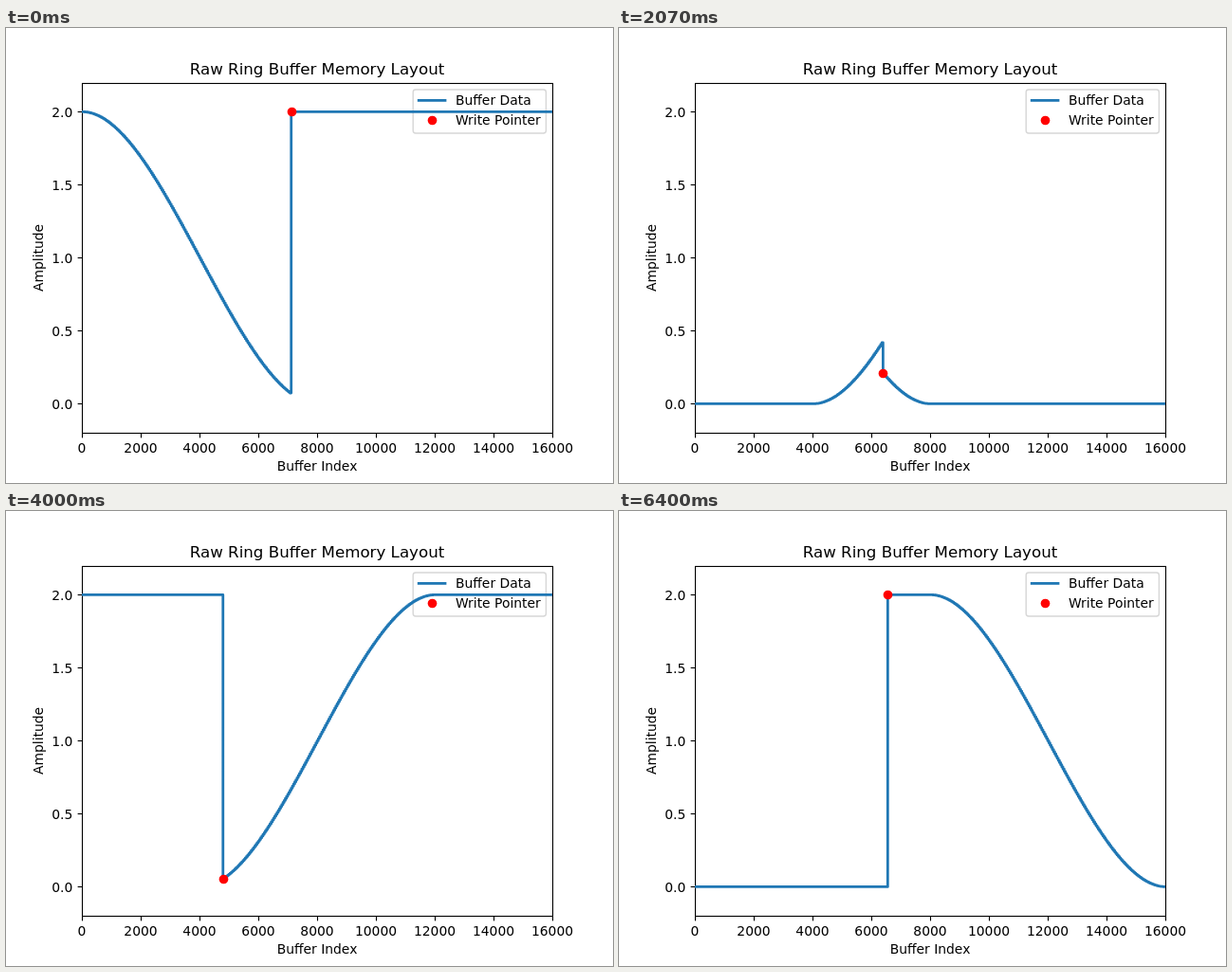
These frames come from a looping animation (640x480 px, 6.47 s). An HTML page with a canvas:

```html
<!DOCTYPE html>
<html lang="en">
<head>
<meta charset="utf-8">
<title>Raw Ring Buffer Memory Layout</title>
<style>
  html, body { margin: 0; width: 100%; height: 100%; overflow: hidden; background: #fff; }
  canvas { display: block; width: 640px; height: 480px; }
</style>
</head>
<body>
<canvas id="stage" width="640" height="480"></canvas>
<script>
const ctx = document.getElementById('stage').getContext('2d');

const LOOP = 6470, FRAMES = 97;
const SIZE = 16000;            // samples in the ring
const BLOCK = 80;              // samples per write
const STEP = 40;               // samples per level of the ramp
const RAMP = 8000, PERIOD = 40000;
const BOX = { x: 80, y: 57.6, w: 496, h: 369.6 };
const BLUE = '#1f77b4', RED = '#ff0000';

// [frame, blocks written so far]; writes arrive slightly unevenly
const WRITES = [
  [0, 89], [10, 150], [16, 188], [20, 212], [30, 276], [31, 280], [40, 335],
  [41, 344], [60, 460], [70, 522], [80, 582], [84, 608], [90, 645], [96, 682]
];

const px = i => BOX.x + i / SIZE * BOX.w;
const py = v => BOX.y + (2.2 - v) / 2.4 * BOX.h;

function ramp(n) {
  const s = Math.min(1, Math.floor(n / STEP) * STEP / RAMP);
  return 2 * s * s * (3 - 2 * s);
}

// Level falls at the start of each period and rises again at its middle.
function signal(n) {
  const p = ((n % PERIOD) + PERIOD) % PERIOD;
  return p < PERIOD / 2 ? 2 - ramp(p) : ramp(p - PERIOD / 2);
}

function written(frame) {
  let j = 1;
  while (WRITES[j][0] < frame) j++;
  const [f0, b0] = WRITES[j - 1], [f1, b1] = WRITES[j];
  return Math.round(b0 + (b1 - b0) * (frame - f0) / (f1 - f0)) * BLOCK;
}

// Frames run at 15 per second, with starts rounded to 10 ms.
function frameAt(t) {
  let k = Math.min(FRAMES - 1, Math.floor(t * 15 / 1000) + 1);
  while (Math.round(k * 20 / 3) * 10 > t) k--;
  return k;
}

function segment(x0, y0, x1, y1) {
  ctx.beginPath();
  ctx.moveTo(x0, y0);
  ctx.lineTo(x1, y1);
  ctx.stroke();
}

function dot(x, y) {
  ctx.fillStyle = RED;
  ctx.beginPath();
  ctx.arc(Math.round(x) + 0.5, Math.round(y) + 0.5, 4.86, 0, Math.PI * 2);
  ctx.fill();
}

function label(text, x, y, align, size = 13.89) {
  ctx.font = size + 'px "DejaVu Sans", sans-serif';
  ctx.textAlign = align;
  ctx.fillStyle = '#000';
  ctx.fillText(text, x, y);
}

function bluePen(cap) {
  ctx.strokeStyle = BLUE;
  ctx.lineWidth = 2.78;
  ctx.lineJoin = 'round';
  ctx.lineCap = cap;
}

function drawAxes() {
  ctx.strokeStyle = '#000';
  ctx.lineWidth = 1.11;
  ctx.lineCap = 'butt';
  ctx.lineJoin = 'miter';
  ctx.strokeRect(80.5, 58.5, 496, 369);
  for (let i = 0; i <= SIZE; i += 2000) {
    const x = px(i);
    segment(x + 0.5, 427.5, x + 0.5, 432.4);
    label(String(i), x, 448, 'center');
  }
  for (let v = 0; v <= 2; v += 0.5) {
    const y = Math.round(py(v)) + 0.5;
    segment(75.6, y, 80.5, y);
    label(v.toFixed(1), 70.3, y + 5.5, 'right');
  }
  label('Raw Ring Buffer Memory Layout', 328, 49, 'center', 16.67);
  label('Buffer Index', 328, 467, 'center');
  ctx.save();
  ctx.translate(39, 242.4);
  ctx.rotate(-Math.PI / 2);
  label('Amplitude', 0, 0, 'center');
  ctx.restore();
}

function drawLegend() {
  ctx.beginPath();
  ctx.roundRect(429.2, 65, 140.2, 46, 2.78);
  ctx.fillStyle = 'rgba(255,255,255,0.8)';
  ctx.fill();
  ctx.strokeStyle = 'rgba(204,204,204,0.8)';
  ctx.lineWidth = 1.39;
  ctx.stroke();
  bluePen('square');
  segment(435.2, 76.4, 463, 76.4);
  dot(449, 97);
  label('Buffer Data', 474, 81, 'left');
  label('Write Pointer', 474, 102, 'left');
}

function drawBuffer(total) {
  const head = total % SIZE, base = total - head;
  ctx.save();
  ctx.beginPath();
  ctx.rect(BOX.x, BOX.y, BOX.w, BOX.h);
  ctx.clip();
  bluePen('square');
  ctx.beginPath();
  for (let i = 0; i < SIZE; i += STEP) {
    const y = py(signal(base + i - (i < head ? 0 : SIZE)));
    ctx.lineTo(px(i), y);
    ctx.lineTo(px(i + STEP - 1), y);
  }
  ctx.stroke();
  ctx.restore();
  dot(px(head), py(signal(total - SIZE)));
}

function draw(t) {
  ctx.fillStyle = '#fff';
  ctx.fillRect(0, 0, 640, 480);
  drawAxes();
  drawLegend();
  drawBuffer(written(frameAt(t)));
}

const start = performance.now();
function tick() {
  draw((performance.now() - start) % LOOP);
  requestAnimationFrame(tick);
}
tick();
</script>
</body>
</html>
```
